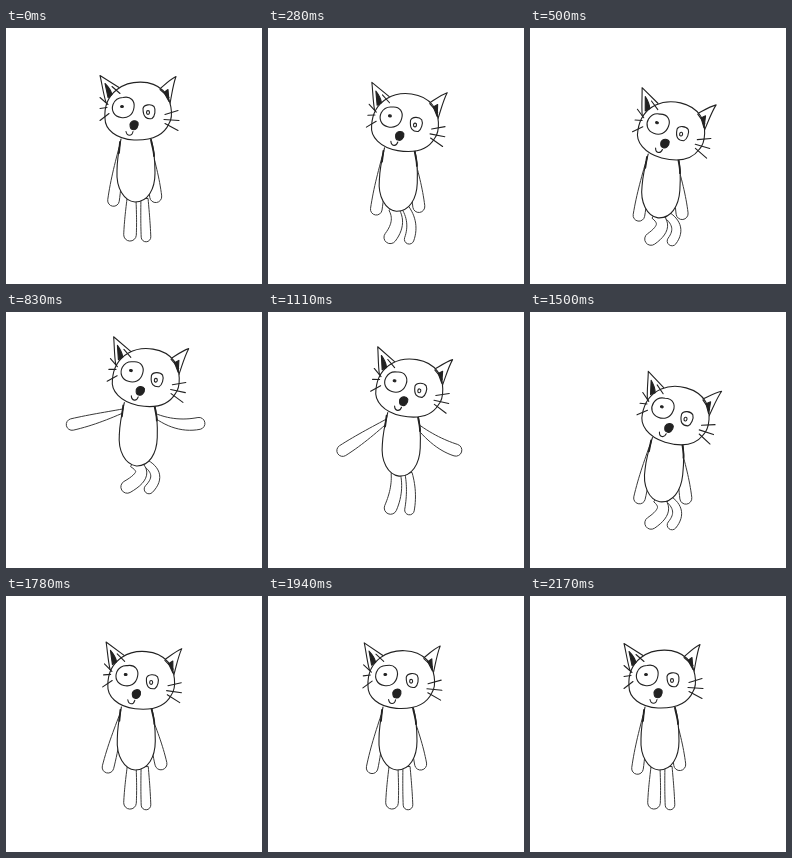
These frames come from a looping animation (256x256 px, 2230 ms). An HTML page:

```html
<!DOCTYPE html>
<html lang="en">
<head>
<meta charset="utf-8">
<title>Jumping cat</title>
<style>
  html, body { margin: 0; width: 100%; height: 100%; overflow: hidden; background: #fff; }
  svg { display: block; width: 100vw; height: 100vh; }
  path, ellipse { fill: #fff; stroke: #222; stroke-width: 1.1; stroke-linecap: round; stroke-linejoin: round; }
  .limb { stroke: #3a3a3a; stroke-width: 1; }
  .line { fill: none; }
  .ink { fill: #222; }
  .thick { fill: none; stroke-width: 1.8; }
</style>
</head>
<body>
<svg viewBox="0 0 256 256">
  <path id="legR" class="limb"/>
  <path id="legL" class="limb"/>
  <path id="armL" class="limb"/>
  <path id="armR" class="limb"/>
  <g id="body">
    <path d="M-15 -32C-17 -22 -19 -12 -19 0C-20 17 -12 30 -1 31C12 31 19 18 19 2C19 -12 18 -22 15 -32"/>
    <path class="thick" d="M-16 -29L-17 -18M15 -31C16 -25 18 -20 18 -15"/>
  </g>
  <g id="head">
    <path d="M-19 -26L-38 -38C-36 -30 -35 -21 -32 -11"/>
    <path d="M21 -24C27 -29 32 -34 38 -37C35 -29 34 -20 32 -10"/>
    <path d="M-21 -24C-8 -34 14 -34 25 -23C33 -15 36 2 31 10C25 24 10 27 -4 26.5C-22 25.5 -33 16 -33 5C-34 -8 -30 -17 -21 -24Z"/>
    <path class="ink" d="M-33 -30C-30 -27 -27 -23 -26 -19L-30 -16Z"/>
    <path class="ink" d="M26 -21L30 -24L31 -12Z"/>
    <path class="line" d="M22 -24L31 -16M-26 -27L-18 -20"/>
    <g transform="translate(0 1)">
      <path class="line" d="M-15 -17C-7 -19 -3 -13 -4 -7C-5 1 -11 4 -17 3C-24 2 -27 -4 -25 -10C-23 -15 -19 -17 -15 -17Z"/>
      <ellipse class="ink" cx="-16" cy="-8" rx="1.4" ry="1"/>
      <path class="line" d="M5 -6C6 -10 13 -11 16 -8C18 -5 17 2 14 4C9 5 5 3 5 -6Z"/>
      <ellipse cx="10" cy="-2" rx="1.5" ry="1.9"/>
      <path class="ink" d="M-8 10C-7 6 -2 5 0 8C1 12 -2 16 -5 15C-7 15 -8 13 -8 10Z"/>
      <path class="line" d="M-12 17C-11 22 -6 22 -5 17"/>
      <path class="line" d="M-38 -17L-30 -10M-38 -6L-31 -7M-38 6L-29 -1M27 0L40 -4M26 5L41 6M27 9L40 16"/>
    </g>
  </g>
</svg>
<script>
const LOOP = 2230, STEPS = 40;
const stepTime = i => Math.round(i * 50 / 9) * 10;

const $ = id => document.getElementById(id);
const rad = deg => deg * Math.PI / 180;
const place = (id, x, y, r) => $(id).setAttribute('transform', `translate(${x} ${y}) rotate(${r})`);

const ease = (a, b, i) => {
  const u = Math.min(1, Math.max(0, (i - a) / (b - a)));
  return u * u * (3 - 2 * u);
};
// Rises from a to b, stays up, falls from c to d
const pulse = (i, a, b, c, d) => ease(a, b, i) - ease(c, d, i);

// Outline of a curved limb that widens from w0 to w1 and ends round
function limb(id, [x0, y0], [cx, cy], [x1, y1], w0, w1) {
  const left = [], right = [], n = 14;
  for (let j = 0; j <= n; j++) {
    const u = j / n, v = 1 - u;
    const x = v * v * x0 + 2 * u * v * cx + u * u * x1;
    const y = v * v * y0 + 2 * u * v * cy + u * u * y1;
    const dx = v * (cx - x0) + u * (x1 - cx), dy = v * (cy - y0) + u * (y1 - cy);
    const s = (w0 + (w1 - w0) * Math.sin(u * Math.PI / 2)) / Math.hypot(dx, dy);
    left.push([x - dy * s, y + dx * s].map(q => q.toFixed(2)));
    right.unshift([x + dy * s, y - dx * s].map(q => q.toFixed(2)));
  }
  $(id).setAttribute('d', `M${left.join('L')}A${w1} ${w1} 0 0 0 ${right.join('L')}Z`);
}

function arm(id, [x, y], side, angle, len, sag, w) {
  const dx = side * Math.sin(rad(angle)) * len, dy = Math.cos(rad(angle)) * len;
  limb(id, [x, y], [x + dx / 2, y + dy / 2 + sag], [x + dx, y + dy], 1.8, w);
}

function leg(id, hip, foot, bend, w0, w1) {
  const knee = [(hip[0] + foot[0]) / 2 + bend * 2, (hip[1] + foot[1]) / 2 - bend * 0.2];
  limb(id, hip, knee, foot, w0, w1);
}

function draw(i) {
  const crouch = pulse(i, 0, 9, 10, 13) + pulse(i, 21, 26, 28, 32);
  const air = Math.max(0, 1 - ((i - 15) / (i < 15 ? 5 : 7)) ** 2);
  const lean = pulse(i, 0, 9, 27, 39);
  const drift = pulse(i, 0, 27, 27, 33);
  const raise = pulse(i, 9, 11, 23, 27) - 0.3 * pulse(i, 16, 20, 20, 23);
  const swing = 6 * pulse(i, 27, 32, 32, 39);

  const bx = 130 + 4 * drift, by = 143 + 16 * crouch - 20 * air;
  const turn = 3 * crouch + 3 * drift;
  const tilt = 6.5 * lean + 5 * crouch + 3 * drift;
  place('body', bx, by, turn);
  place('head', bx + 2 + 0.66 * tilt, by - 57.5 + 0.28 * tilt, tilt);

  const cos = Math.cos(rad(turn)), sin = Math.sin(rad(turn));
  const onBody = (x, y) => [bx + x * cos - y * sin, by + x * sin + y * cos];

  arm('armL', onBody(-15, -24), -1, 8 + 67 * raise + 5 * drift * (1 - raise) + swing, 54, raise, 5.8);
  arm('armR', onBody(14, -21), 1, 7 + 72 * raise + swing, 47, 9 * raise, 6);

  const footY = 207 + 4 * crouch - 32 * air ** 1.5;
  const bend = 9 * crouch + 11 * air * air;
  leg('legL', onBody(-4.5, 28), [124 - 3 * crouch - 3 * air, footY], bend, 4.5, 6.3);
  leg('legR', onBody(8.5, 28), [140 + 2 * crouch + 3 * air, footY + 2], bend * 0.7, 3.6, 4.8);
}

function tick() {
  const t = performance.now() % LOOP;
  let i = STEPS - 1;
  while (stepTime(i) > t) i--;
  draw(i);
  requestAnimationFrame(tick);
}
tick();
</script>
</body>
</html>
```
